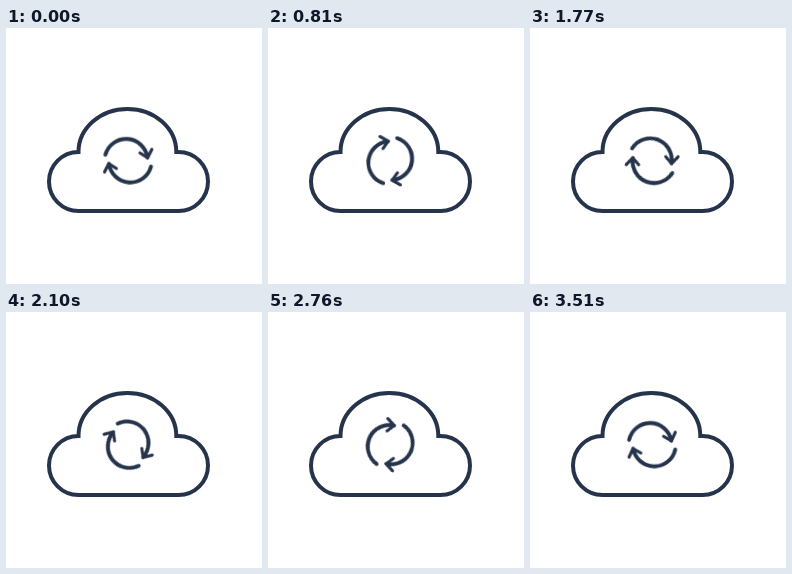
An HTML page without scripts that plays this animation: 256x256 px, repeating every 3.54 s.

```html
<!DOCTYPE html>
<html lang="en">
<head>
<meta charset="utf-8">
<title>Cloud sync</title>
<style>
  html, body { margin: 0; width: 100%; height: 100%; overflow: hidden; background: #fff; }
  svg { display: block; width: 100%; height: 100%; }
  .line { fill: none; stroke: #25344b; stroke-width: 4; }
  .arrows { stroke-linecap: round; stroke-linejoin: round; stroke-width: 3.9; }
  .head { stroke-width: 3.1; }
  .spin { animation: spin 3540ms linear infinite; }

  /* The turn starts briskly and slows slightly towards the end. */
  @keyframes spin {
    0% { transform: rotate(0deg); }
    11.864% { transform: rotate(49deg); }
    33.898% { transform: rotate(136.5deg); }
    50% { transform: rotate(197deg); }
    69.492% { transform: rotate(264deg); }
    86.441% { transform: rotate(317deg); }
    100% { transform: rotate(360deg); }
  }
</style>
</head>
<body>
<svg viewBox="0 0 256 256" role="img" aria-label="Cloud synchronising">
  <defs>
    <g id="arrow">
      <path d="M-22.8 -6A21.5 21.5 0 0 1 19.2 -3.3"/>
      <path class="head" d="M11.8 -7.8L19.4 -3L23.6 -11.3"/>
    </g>
  </defs>
  <path class="line" d="M72.5 183A29.5 29.5 0 0 1 72.5 124A48.9 43 0 0 1 170.3 124H172.5A29.5 29.5 0 0 1 172.5 183Z"/>
  <g transform="translate(122.2 132.7)">
    <g class="line arrows spin">
      <use href="#arrow"/>
      <use href="#arrow" transform="rotate(180)"/>
    </g>
  </g>
</svg>
</body>
</html>
```
